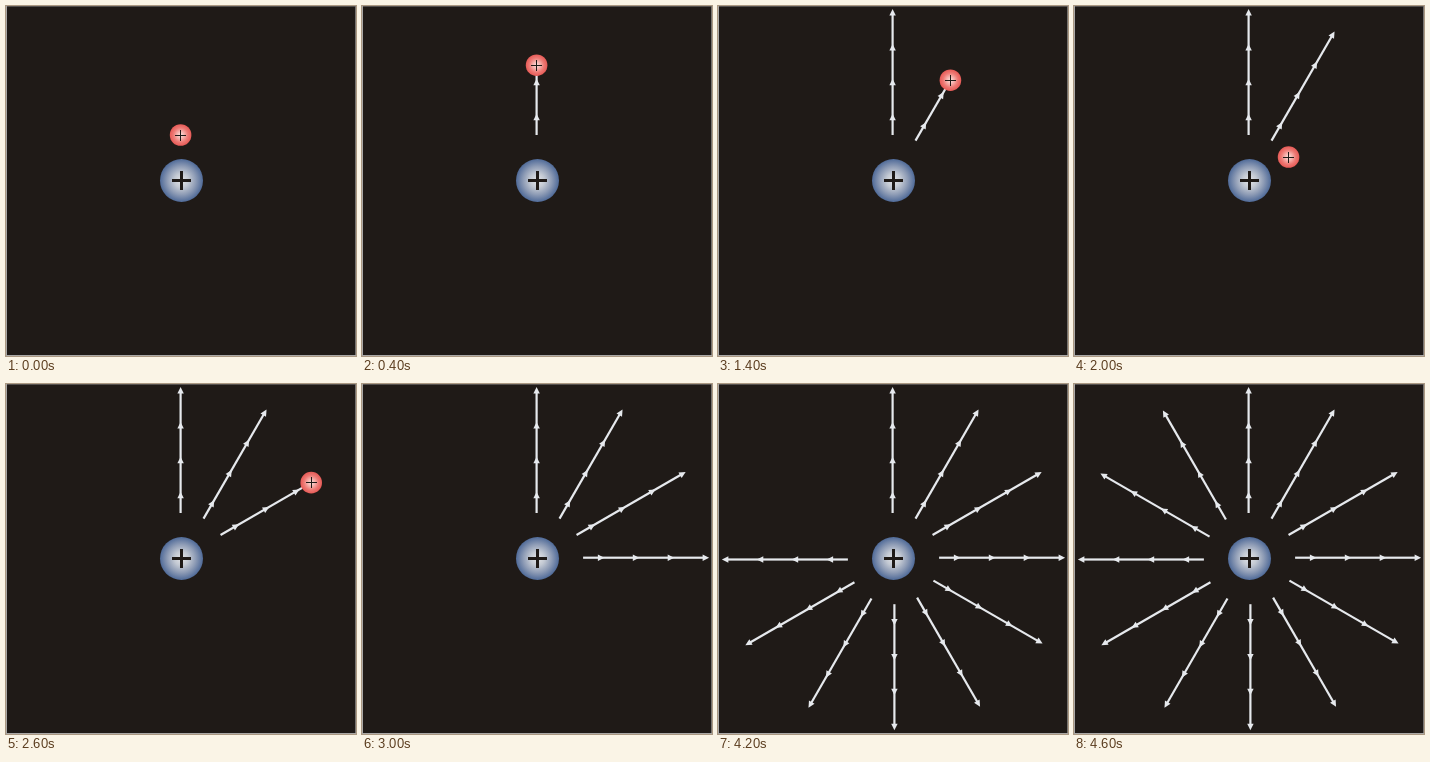
Recreate the animation shown at these times as an HTML page with a canvas. Size 350 by 350 pixels, loop 4.8 s.

```html
<!DOCTYPE html>
<html lang="en">
<head>
<meta charset="utf-8">
<title>Electric field lines of a positive charge</title>
<style>
  html, body { margin: 0; width: 100%; height: 100%; overflow: hidden; background: #1f1a17; }
  canvas { display: block; }
</style>
</head>
<body>
<canvas id="stage" width="350" height="350"></canvas>
<script>
const ctx = document.getElementById('stage').getContext('2d');
const DARK = '#1f1a17', LINE = '#e6e9ed';
const CX = 175.5, CY = 174.6;      // centre of the field
const SIDE = -0.9;                 // sideways offset of every line
const START = 45.6, TIP = 171.6, STEP = 34.9;
const FRAME = 200, LOOP = 4800;

function rect(color, x, y, w, h) {
  ctx.fillStyle = color;
  ctx.fillRect(x, y, w, h);
}

function charge(x, y, r, stops, arm, width) {
  const g = ctx.createRadialGradient(x, y, 0, x, y, r);
  stops.forEach((c, i) => g.addColorStop(i / (stops.length - 1), c));
  ctx.fillStyle = g;
  ctx.beginPath();
  ctx.arc(x, y, r, 0, 2 * Math.PI);
  ctx.fill();
  const px = Math.floor(x) + 0.5, py = Math.floor(y) + 0.5;
  rect(DARK, px - arm, py - width / 2, 2 * arm, width);
  rect(DARK, px - width / 2, py - arm, width, 2 * arm);
}

// A field line from START out to `end`, with the first `heads` arrowheads.
function fieldLine(index, end, heads) {
  ctx.save();
  ctx.translate(CX, CY);
  ctx.rotate(index * Math.PI / 6);
  ctx.translate(SIDE, 0);
  rect(LINE, -1.1, -end, 2.2, end - START);
  for (let h = 0; h < heads; h++) {
    const y = h * STEP - TIP + (4 - heads) * STEP;
    ctx.beginPath();
    ctx.moveTo(0, y);
    ctx.lineTo(3.2, y + 6.5);
    ctx.lineTo(-3.2, y + 6.5);
    ctx.fill();
  }
  ctx.restore();
}

function testCharge(index, distance) {
  const a = index * Math.PI / 6, s = Math.sin(a), c = Math.cos(a);
  charge(CX + distance * s + SIDE * c, CY - distance * c + SIDE * s, 10.8,
    ['#fbe3df', '#f6b3ae', '#ee7a75', '#e65a56'], 5.5, 1);
}

function draw(time) {
  const f = Math.floor(time % LOOP / FRAME);
  const full = f < 15 ? Math.floor((f + 1) / 5) : f - 11;
  const step = f % 5;

  rect(DARK, 0, 0, 350, 350);
  rect('#55514f', 0, 0, 350, 1);
  rect('#77736f', 349, 0, 1, 350);
  rect('#aaa8a6', 0, 0, 1, 350);
  rect('#aaa8a6', 0, 349, 350, 1);

  for (let i = 0; i < full; i++) fieldLine(i, TIP - 4, 4);
  charge(CX, 174.5, 21.5, ['#e4e5e7', '#c3c9d3', '#8d9bb5', '#4f6a98'], 9.5, 3);

  if (f < 15 && step < 4) {
    const distance = START + step * STEP;
    if (step) fieldLine(full, distance, step);
    testCharge(full, distance);
  }
}

function tick() {
  draw(performance.now());
  requestAnimationFrame(tick);
}
tick();
</script>
</body>
</html>
```
